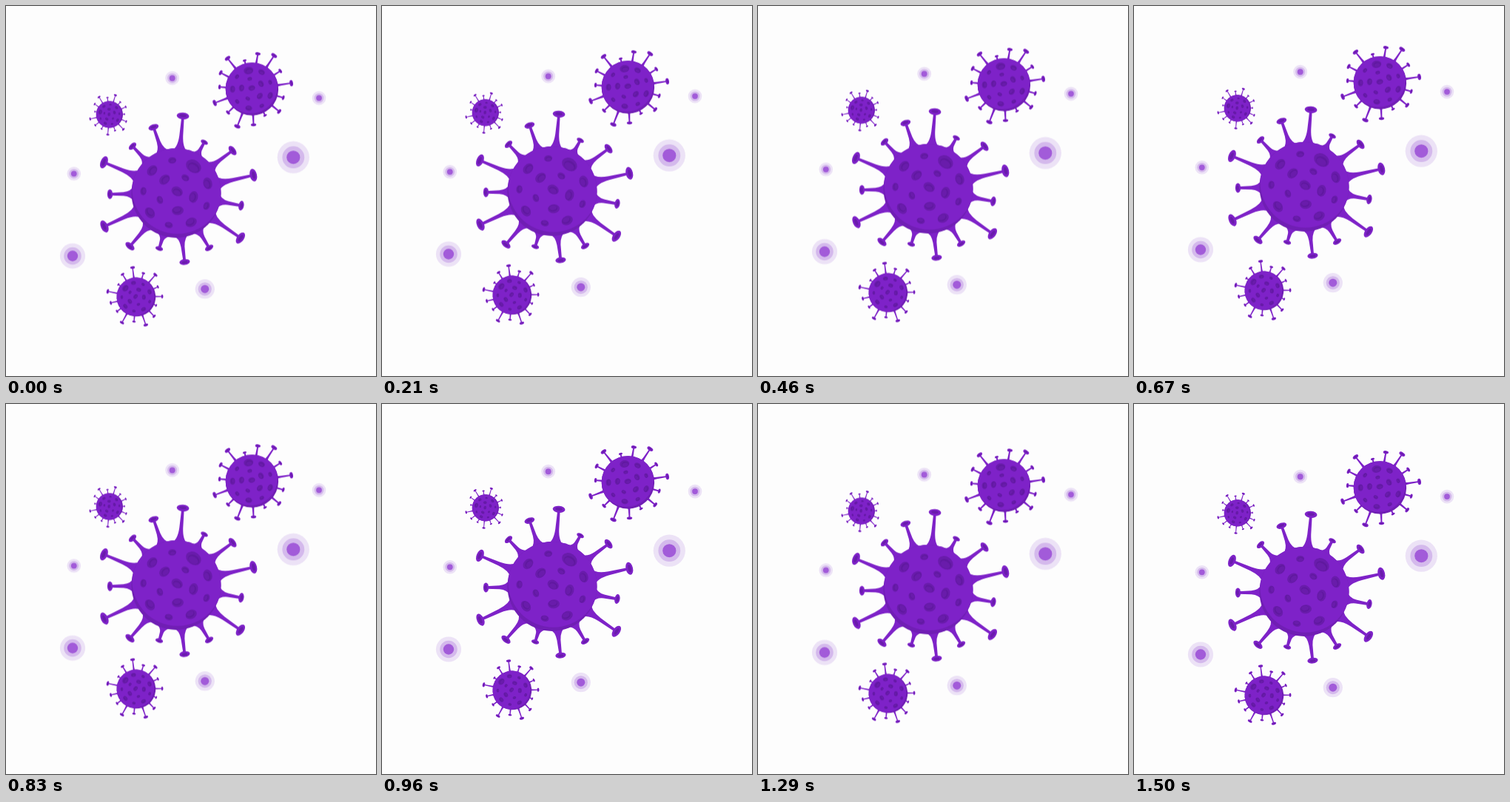
An HTML page for the animation above (1540 ms loop, 500x500 px).

```html
<!DOCTYPE html>
<html lang="en">
<head>
<meta charset="utf-8">
<title>Floating viruses</title>
<style>
  html, body { margin: 0; width: 100%; height: 100%; overflow: hidden; background: #fdfdfd; }
  svg { display: block; width: 100vw; height: 100vh; }
  #float { will-change: transform; }
</style>
</head>
<body>
<svg viewBox="0 0 500 500"><g id="float"></g></svg>
<script>
const BODY = '#7e22c8', SHADE = '#701eb4', SPOT = '#691cab', DEEP = '#5f199e';
const R = 60.5;

// spike reach repeats every seven spikes, after one long spike at the top
const REACH = [78.5, 95.3, 107, 89.5, 106, 86.5, 94];

// virus: x, y, scale, rotation
const VIRUSES = [
  [230, 253.4, 1, 0],
  [332.4, 112.9, 0.507, -43.5],
  [175.9, 393.9, 0.374, -84],
  [139.9, 147.3, 0.257, -108]
];

// dot: x, y, radius
const DOTS = [
  [224.7, 98.2, 9.4], [423, 125.1, 9.3], [388.3, 205.2, 21.6],
  [91.8, 227.3, 9.3], [90, 338.5, 17.1], [268.8, 383.2, 13.1]
];

const range = (n, draw) => Array.from({ length: n }, (_, i) => draw(i)).join('');
const circle = (x, y, r, fill) => `<circle cx="${x}" cy="${y}" r="${r}" fill="${fill}"/>`;
const ellipse = (x, y, rx, ry, fill) =>
  `<ellipse cx="${x}" cy="${y}" rx="${rx}" ry="${ry}" fill="${fill}"/>`;

function spike(i) {
  const tip = i ? REACH[(i - 1) % REACH.length] : 104.5;
  const cap = 5.2 + (tip - 78) * 0.12;
  const neck = -58 - (tip - 58) * 0.42;
  return `<g transform="rotate(${5 + i * 24})">
    <path fill="${BODY}" d="M-11-57Q-3.4-61-2.5 ${neck}L-1.7 ${-tip}H1.7L2.5 ${neck}Q3.4-61 11-57Z"/>
    ${ellipse(0, -tip, cap, cap * 0.55, BODY)}
    ${ellipse(0, -tip - 0.4, cap * 0.58, cap * 0.24, SPOT)}</g>`;
}

// a dent at a polar position, its long side along the rim
const spot = (angle, dist, size) =>
  `<g transform="rotate(${angle}) translate(${dist})">
    ${ellipse(0, 0, size * 0.76, size, SPOT)}
    ${ellipse(-0.1 * size, 0.1 * size, size * 0.54, size * 0.74, DEEP)}
    ${ellipse(-0.2 * size, 0.1 * size, size * 0.42, size * 0.64, SPOT)}</g>`;

// evenly spaced dents, with the large ones spread among the small
const ring = (n, dist, start, large, shift) => range(n, i =>
  spot(start + i * 360 / n, dist, (i * large + shift) % n < large ? 7.9 : 5.5));

// lit upper part of the body, leaving a thin crescent below
const lit = `<g clip-path="url(#disc)">${circle(1.8, -6, 61.3, BODY)}</g>`;
const body = circle(0, 0, R, SHADE) + lit +
  ring(9, 44.5, -137, 5, 3) + ring(5, 24, -131, 3, 1) + spot(-57, 43, 11) + spot(-60, 2.5, 8);
const spikes = range(15, spike);

// small viruses have a plumper body for their spikes
const virus = ([x, y, scale, turn]) =>
  `<g transform="translate(${x} ${y}) rotate(${turn}) scale(${scale})">
    ${spikes}<g transform="scale(${scale < 1 ? 1.165 : 1})">${body}</g></g>`;

const dot = ([x, y, r]) =>
  circle(x, y, r, '#ece2f6') + circle(x, y, r * 0.69, '#d4b9ec') + circle(x, y, r * 0.42, '#a25bd9');

const scene = document.getElementById('float');
scene.innerHTML = `<clipPath id="disc"><circle r="${R}"/></clipPath>` +
  DOTS.map(dot).join('') + VIRUSES.map(virus).join('');

// steady rise and fall, slightly under way at the start
scene.animate(
  { transform: ['translateY(0)', 'translateY(-10px)'] },
  { duration: 770, delay: -40, direction: 'alternate', iterations: Infinity }
);
</script>
</body>
</html>
```
